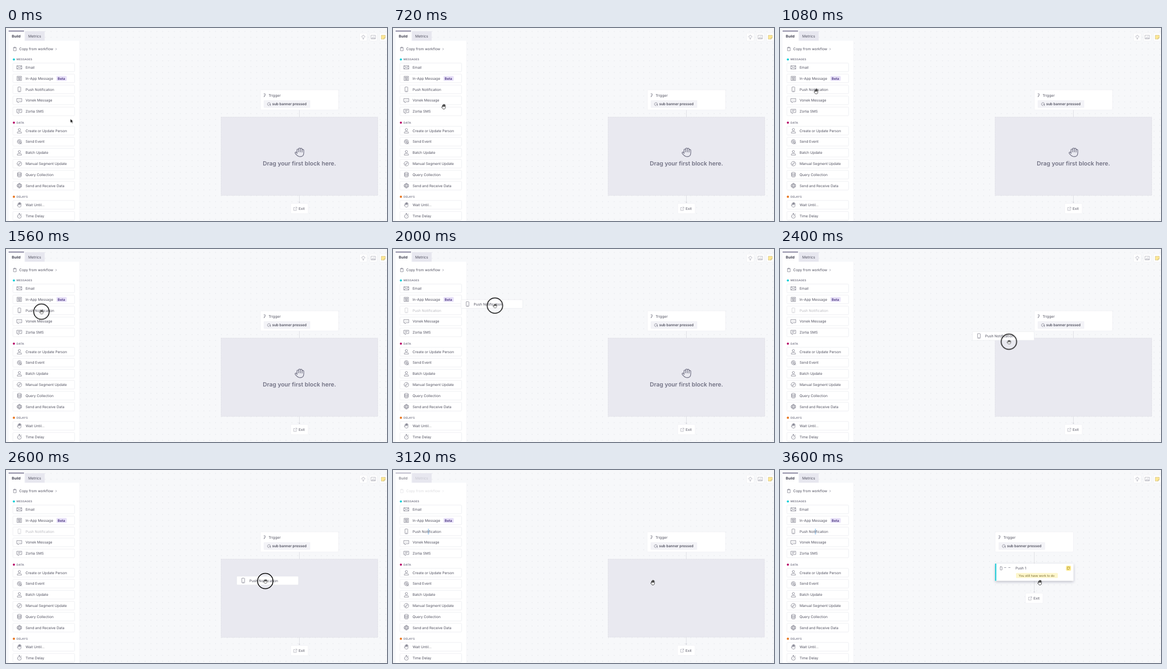
Animation of 720 by 365 pixels, one loop 4120 ms. Source, as an HTML page:

```html
<!DOCTYPE html>
<html lang="en">
<head>
<meta charset="utf-8">
<title>Workflow builder</title>
<style>
html, body { margin: 0; width: 100%; height: 100%; overflow: hidden; background: #f7f8fa; }
svg { display: block; width: 720px; height: 365px; }
text { font: 400 6.7px Inter, sans-serif; fill: #50505f; text-rendering: geometricPrecision; white-space: pre; }
.bold { font-weight: 600; }
.icon { fill: none; stroke: #5c5c6d; stroke-width: .62; stroke-linejoin: round; stroke-linecap: round; }
.soft { stroke: #9a9aa8; }
.card { fill: #fff; stroke: #e7e8ed; stroke-width: .7; }
.line { stroke: #dcdde3; stroke-width: .9; }
.pointer { fill: #fff; stroke: #111; stroke-width: .8; stroke-linejoin: round; }
.label { font-size: 5px; font-weight: 600; letter-spacing: .28px; fill: #6c6c7e; }

/* One loop is 4120 ms; 1% is 41.2 ms. */
.anim { animation: 4120ms linear infinite; }
.hold { animation-timing-function: step-end; }
#cursor { animation-name: travel; }
#arrow { animation-name: arrow; }
#open { animation-name: open; }
#grip { animation-name: grip; }
#ghost { animation-name: drag, carried; animation-timing-function: linear, step-end; }
#row-phone { animation-name: taken; }
#hint { animation-name: hint; }
#selection { animation-name: selected; }
.header { animation-name: dim; }
#trigger { animation-name: recenter; }
#exit { animation-name: rise; }
#zone { animation-name: shrink; }
#block { animation-name: arrive; }

@keyframes travel {
  0%, 11.65% { transform: translate(121.6px, 171.7px); }
  17.48% { transform: translate(96px, 149px); animation-timing-function: ease-out; }
  24.27% { transform: translate(69px, 121px); }
  30.1%, 39.81% { transform: translate(67px, 118.5px); }
  44.17% { transform: translate(112px, 111px); }
  48.54% { transform: translate(192px, 107px); }
  50.49% { transform: translate(234px, 110px); }
  54.37% { transform: translate(331px, 134px); }
  58.25% { transform: translate(432px, 175px); animation-timing-function: ease-out; }
  63.11%, 69.89% { transform: translate(490px, 210px); }
  69.9%, 100% { transform: translate(491px, 213px); }
}
@keyframes drag {
  0%, 39.81% { transform: translate(0, 0); }
  44.17% { transform: translate(37px, -6px); }
  48.54% { transform: translate(115px, -12px); }
  50.49% { transform: translate(155px, -10px); }
  54.37% { transform: translate(250px, 9px); }
  58.25% { transform: translate(350px, 48px); animation-timing-function: ease-out; }
  63.11%, 100% { transform: translate(423px, 93px); }
}
@keyframes arrow { 0% { opacity: 1; } 13.59%, 100% { opacity: 0; } }
@keyframes open { 0% { opacity: 0; } 13.59% { opacity: 1; } 37.86% { opacity: 0; } 69.9%, 100% { opacity: 1; } }
@keyframes grip { 0% { opacity: 0; } 37.86% { opacity: 1; } 69.9%, 100% { opacity: 0; } }
@keyframes carried { 0% { opacity: 0; } 39.81% { opacity: 1; } 69.9%, 100% { opacity: 0; } }
@keyframes taken { 0% { opacity: 1; } 39.81% { opacity: .4; } 69.9%, 100% { opacity: 1; } }
@keyframes hint { 0% { opacity: 1; } 57.28%, 100% { opacity: 0; } }
@keyframes selected { 0% { opacity: 0; } 69.9%, 100% { opacity: 1; } }
@keyframes dim {
  0%, 69.8% { opacity: 1; }
  70.87%, 76.7% { opacity: var(--dim); }
  79.6%, 100% { opacity: 1; }
}
@keyframes recenter { 0%, 75.73% { transform: none; } 81.55%, 100% { transform: translate(-74px, 0); } }
@keyframes rise { 0%, 75.73% { transform: none; } 81.55%, 100% { transform: translate(-74px, -99px); } }
@keyframes shrink {
  0%, 75.73% { width: 296px; height: 148px; y: 168.5px; opacity: 1; }
  79.6% { opacity: 1; }
  81.55%, 100% { width: 148px; height: 32px; y: 177px; opacity: 0; }
}
@keyframes arrive { 0%, 77.67% { opacity: 0; } 81.55%, 100% { opacity: 1; } }
</style>
</head>
<body>
<svg viewBox="0 0 720 365">
  <defs>
    <pattern id="dots" width="11.1" height="11.1" x="2" y="1" patternUnits="userSpaceOnUse">
      <circle cx="5.5" cy="5.5" r=".58" fill="#d3d5dc"/>
    </pattern>
    <filter id="shadow" x="-10%" y="-30%" width="120%" height="170%">
      <feDropShadow dx="0" dy="2" stdDeviation="2.5" flood-color="#30304a" flood-opacity=".3"/>
    </filter>
    <path id="fist" d="M-2.4 1.2V-2.2a.8.8 0 0 1 1.6 0V-.3V-3.2a.8.8 0 0 1 1.6 0V-.3V-3a.8.8 0 0 1 1.6 0V-.1V-1.9a.8.8 0 0 1 1.6 0V.8C4 3 2.7 4.2.6 4.2C-1.5 4.2-2.6 3-4 1.2C-4.6.2-3.6-.6-2.9.1L-2.4.7"/>
  </defs>
  <rect width="720" height="365" fill="#f7f8fa"/>
  <rect width="720" height="365" fill="url(#dots)"/>

  <g id="tools"></g>

  <g id="exit" class="anim">
    <path class="line" d="M554.5 302V329"/>
    <path d="M552.8 328.7h3.4l-1.7 2.6z" fill="#cfd0d8"/>
    <rect class="card" x="538" y="332" width="33" height="19" rx="1.5" style="stroke:#f0f0f4"/>
    <path class="icon soft" d="M546 339.5h-2.3v5.5h5v-2.3M546.5 342.2l3-3M547.3 338.8h2.5v2.5"/>
    <text x="553" y="344.2">Exit</text>
  </g>

  <g id="trigger" class="anim">
    <path class="line" d="M554.5 155V180"/>
    <rect class="card" x="480.5" y="117" width="148" height="38" rx="1.5" style="stroke:#eeeef2"/>
    <path class="icon" d="M487.3 124.4h2.6l-.7 2h1.1l-2.5 4 .3-2.8"/>
    <text x="496.2" y="129.5">Trigger</text>
    <rect x="487" y="136.5" width="88" height="14.5" rx="1.5" fill="#f3f3f7"/>
    <path class="icon" d="M499.7 145a2.9 2.9 0 1 0-2.6 1.9M497.2 144l3 1.1-1.3.6 1 1.3"/>
    <text class="bold" x="503" y="146.2" style="font-size:6.75px">sub banner pressed</text>
  </g>

  <rect id="zone" class="anim" x="406.5" y="168.5" width="296" height="148" fill="#e9e9f0" stroke="#d8d8e1" stroke-width=".8" stroke-dasharray="2 1.2"/>
  <g id="hint" class="anim hold">
    <use href="#fist" class="icon" transform="translate(554.7 235) scale(2)" style="stroke:#6b6b7f;stroke-width:.6"/>
    <text class="bold" x="554.5" y="260" text-anchor="middle" style="font-size:11px;fill:#737385">Drag your first block here.</text>
  </g>

  <g id="block" class="anim">
    <rect x="407" y="177" width="147.5" height="32.5" rx="1" fill="#fff" filter="url(#shadow)"/>
    <rect x="406.5" y="177" width="2.2" height="32.5" fill="#18cbd8"/>
    <rect class="icon" x="416.2" y="183" width="3.5" height="6" rx=".6"/>
    <path class="icon" d="M424 184.5h3M432 184.5h3"/>
    <text x="445" y="188">Push 1</text>
    <rect x="540.5" y="181" width="9.5" height="9.5" rx="2" fill="#ffeb91"/>
    <path class="icon" style="stroke:#806c13" d="M543.4 183.5h3.8v3l-1.3 1.5h-2.5z"/>
    <rect x="446" y="194.7" width="79" height="9.6" rx="1.5" fill="#fdf6cb"/>
    <text x="451" y="201.7" style="font-size:5.9px;fill:#75692f">You still have work to do</text>
  </g>

  <path d="M5 24H138.3V365H5z" fill="#fff"/>
  <rect x="5" y="5" width="29" height="19" fill="#fff"/>
  <rect x="36" y="6" width="37" height="18" fill="#e7e7ef"/>
  <g class="header anim" style="--dim:.55">
    <rect x="5" y="5" width="29" height="1.5" fill="#696486"/>
    <text class="bold" x="11" y="18" style="font-size:6.8px;fill:#29293b">Build</text>
  </g>
  <g class="header anim" style="--dim:.2">
    <text x="42" y="18" style="font-size:6.9px">Metrics</text>
    <path class="icon" d="M15 37h-.8v6h5v-6h-.8M15.5 36.2h2.4v1.4h-2.4z"/>
    <text x="25" y="42.2">Copy from workflow</text>
    <path class="icon" d="M94 38.4l1.5 1.5-1.5 1.5"/>
  </g>
  <rect id="selection" class="anim hold" x="65.8" y="111" width="2.4" height="11" fill="#b9d9f5"/>
  <g id="panel"></g>
  <g id="ghost" class="anim"></g>

  <g id="cursor" class="anim">
    <path id="arrow" class="anim hold" d="M0 0V7.5l1.8-1.6 1.3 2.7 1.4-.7L3.2 5.3H5.6z" fill="#000" stroke="#fff" stroke-width=".7"/>
    <path id="open" class="pointer anim hold"/>
    <g id="grip" class="anim hold">
      <circle r="14.6" fill="none" stroke="#000" stroke-width="1.5"/>
      <use class="pointer" href="#fist" transform="translate(0 .7) scale(.85)"/>
    </g>
  </g>
</svg>
<script>
const circle = r => `M${-r} 0a${r} ${r} 0 1 0 ${2 * r} 0a${r} ${r} 0 1 0 ${-2 * r} 0`;
const icons = {
  mail: 'M-4.5-3h9v6h-9zl4.5 3.6 4.5-3.6M-4.5 3l3-3M4.5 3l-3-3',
  note: 'M-4-4h8v8h-8zM-2.2-2.2h4.4v1.6h-4.4zM-2.2 1h4.4M-2.2 2.5h4.4',
  phone: 'M-2-4.5h4l.6.6v7.8l-.6.6h-4l-.6-.6v-7.8zM-.6 3h1.2',
  chat: 'M-4.5-3.5h9v6h-5l-2 2v-2h-2zM-2-.5h.1M0-.5h.1M2-.5h.1',
  sms: 'M-4.5-4h9v6.2h-5l-1.8 2v-2h-2.2zM-2.3-2h4.6M-2.3 0h3',
  person: 'M-2.1-2a2.1 2.3 0 1 0 4.2 0a2.1 2.3 0 1 0-4.2 0M-4 4.2v-.8q.3-1.8 2.7-2h2.6q2.4.2 2.7 2v.8z',
  event: 'M4 0a4 4 0 1 0-4 4M2.1-.4a2.2 2.2 0 1 0-2.5 2.5M0 0l4.6 1.6-2 1 1.8 1.8M0 0l1.6 4.6 1-2',
  segment: circle(4.3) + 'M-2 2l.5-1.6 2.8-2.8 1.1 1.1-2.8 2.8z',
  data: 'M-3.6-3a3.6 1.5 0 1 0 7.2 0a3.6 1.5 0 1 0-7.2 0v6a3.6 1.5 0 0 0 7.2 0v-6M-3.6-1a3.6 1.5 0 0 0 7.2 0M-3.6 1a3.6 1.5 0 0 0 7.2 0',
  globe: circle(4.3) + 'M0-4.3q-4 4.3 0 8.6q4-4.3 0-8.6M-4-1.5h8M-4 1.5h8',
  palm: 'M-2.6.6V-2.2a.7.7 0 0 1 1.4 0V0V-3.6a.7.7 0 0 1 1.4 0V-.4V-3.9a.7.7 0 0 1 1.4 0V-.2V-2.8a.7.7 0 0 1 1.4 0V1.5C3 3.6 1.8 4.5.3 4.5C-1.5 4.5-2.4 3.6-4 .8a.8.8 0 0 1 1.4-.2',
  timer: 'M-3.6 1a3.6 3.6 0 1 0 7.2 0a3.6 3.6 0 1 0-7.2 0M0 1l1.5-1.5M-1.2-4.4h2.4M0-4.4v1.8M3-2.6l.8-.8',
  bulb: 'M-1 2v-1.2a2.2 2.2 0 1 1 2 0V2zM-.8 3.5h1.6M-4-.8h.5M3.5-.8h.5M0-4.4v.4M-2.8-3.7l.3.3M2.8-3.7l-.3.3',
  image: 'M-4-3.5h8v7h-8zM-3 2.3l2-2.6 1.3 1.5 1-1 1.7 2.1zM1-1.7h.5'
};
const sections = [
  ['MESSAGES', '#16d0d8', 59.5, 74.5, [['mail', 'Email'], ['note', 'In-App Message'],
    ['phone', 'Push Notification'], ['chat', 'Vonek Message'], ['sms', 'Zorlia SMS']]],
  ['DATA', '#b90f6c', 179, 194.2, [['person', 'Create or Update Person'], ['event', 'Send Event'],
    ['person', 'Batch Update'], ['segment', 'Manual Segment Update'], ['data', 'Query Collection'],
    ['globe', 'Send and Receive Data']]],
  ['DELAYS', '#e97926', 319.2, 334.4, [['palm', 'Wait Until...'], ['timer', 'Time Delay']]]
];
const pitch = 20.8;
const byId = id => document.getElementById(id);
const icon = (name, x, y, tone = '') => `<path class="icon ${tone}" transform="translate(${x} ${y})" d="${icons[name]}"/>`;
const content = (name, label, y) => icon(name, 25.3, y) + `<text x="37" y="${y + 2.4}">${label}</text>`;
const frame = (y, fill) => `<rect class="card" x="13" y="${y - 8.2}" width="116.7" height="16.4" rx="1.5" style="fill:${fill}"/>`;

byId('panel').innerHTML = sections.map(([title, color, titleY, top, rows]) =>
  `<circle cx="14.9" cy="${titleY}" r="2.1" fill="${color}"/>
   <text class="label" x="20" y="${titleY + 1.9}">${title}</text>` +
  rows.map(([name, label], i) => {
    const y = top + i * pitch;
    const attrs = name === 'phone' ? 'id="row-phone" class="anim hold"' : '';
    return frame(y, 'none') + `<g ${attrs}>${content(name, label, y)}</g>`;
  }).join('')).join('') +
  `<rect x="95.3" y="90.7" width="19.5" height="9.2" rx="2" fill="#e8e1f8"/>
   <text class="bold" x="97.8" y="97.5" style="font-size:6.3px;fill:#3f2a78">Beta</text>`;

const phoneY = sections[0][3] + 2 * pitch;
byId('ghost').innerHTML = frame(phoneY, '#fff') + content('phone', 'Push Notification', phoneY);
byId('open').setAttribute('d', icons.palm + 'z');
byId('tools').innerHTML = [675.2, 694.2, 713].map(x =>
  `<rect x="${x - 7}" y="10" width="14" height="14.5" rx="1.5" fill="#fff" stroke="#ececf0" stroke-width=".6"/>`).join('') +
  icon('bulb', 675.2, 17.5, 'soft') + icon('image', 694.2, 17.2, 'soft') +
  '<path d="M709.2 13.7h7.6v4.8l-2.6 2.6h-5z" fill="#ffe894" stroke="#b5a468" stroke-width=".5"/><path d="M716.8 18.5h-2.6v2.6z" fill="#fff4c4" stroke="#b5a468" stroke-width=".5"/>';
</script>
</body>
</html>
```
